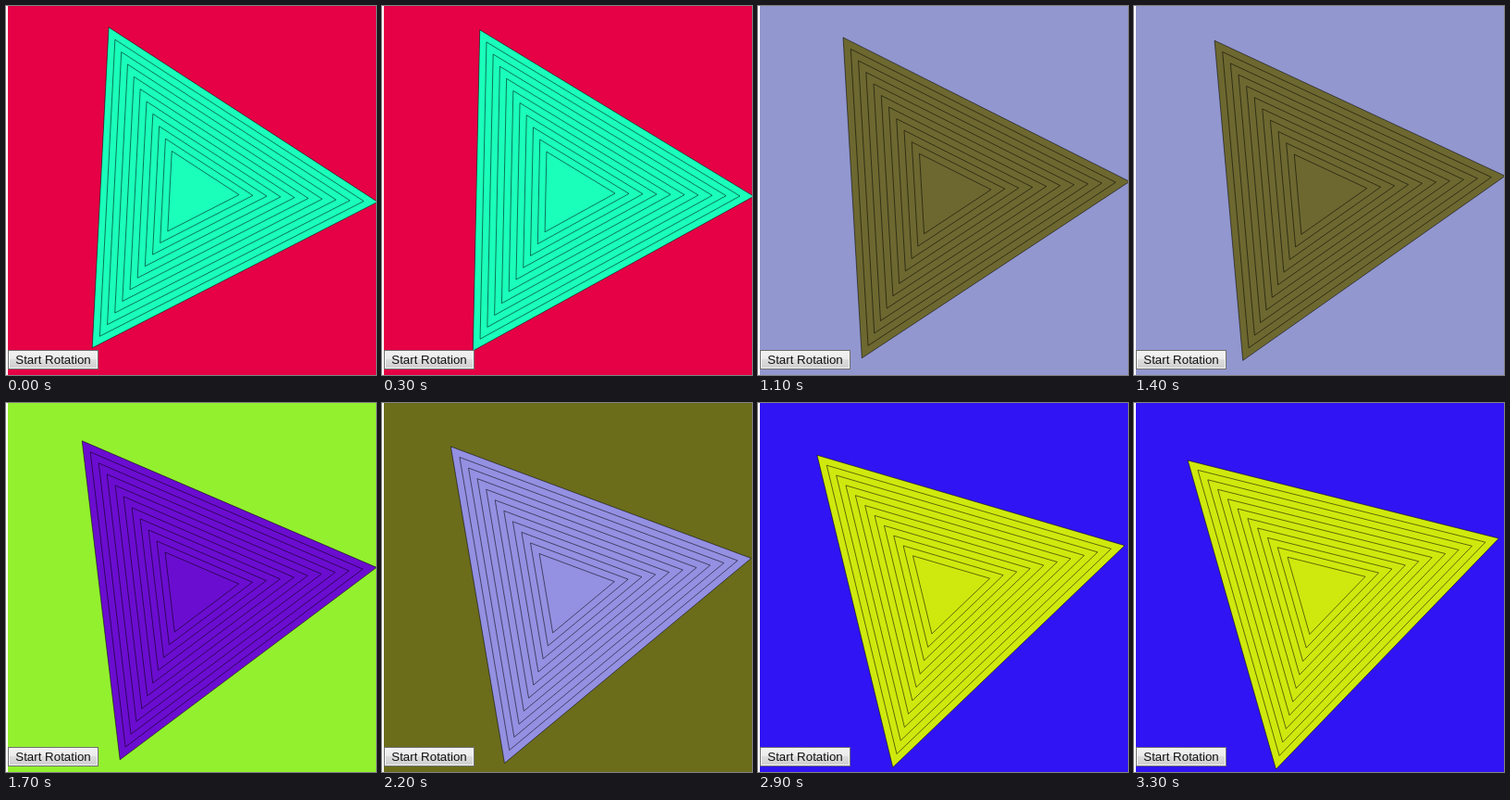
Write an HTML page with a canvas that moves like this. It is 400 px wide and 398 px high and loops after 3.4 s.

```html
<!DOCTYPE html>
<html lang="en">
<head>
<meta charset="utf-8">
<title>Rotating triangles</title>
<style>
html, body { margin: 0; width: 400px; height: 398px; overflow: hidden; background: #fff; }
canvas { position: absolute; left: 2px; top: 0; }
button {
  position: absolute; left: 2px; top: 371px; width: 98px; height: 21px;
  box-sizing: border-box; margin: 0; padding: 0;
  border: 1px solid #707070; border-radius: 0;
  background: linear-gradient(#f2f2f2, #ebebeb 50%, #dddddd 50%, #cfcfcf);
  box-shadow: inset 0 0 0 1px #f3f3f3; color: #111;
  font: 13.333px/19px Arial, "Liberation Sans", sans-serif; white-space: nowrap;
}
</style>
</head>
<body>
<canvas width="398" height="398"></canvas>
<button type="button">Start Rotation</button>
<script>
const ctx = document.querySelector('canvas').getContext('2d');
const LOOP = 3400, STEP = 100, CX = 200, CY = 201;
const START_ANGLE = 0.0515, TURN = 0.01;
// [background, triangle]
const palette = [
  ['#e60045', '#1affba'],
  ['#a0e044', '#5e1eba'],
  ['#9297cf', '#6d6830'],
  ['#93f02f', '#6b0dd0'],
  ['#6b6d1b', '#9490e2'],
  ['#3014f4', '#cfe90e']
];
ctx.lineWidth = 0.55;

function triangle(radius, angle) {
  ctx.beginPath();
  for (let i = 0; i < 3; i++) {
    const a = angle + i * Math.PI * 2 / 3;
    ctx.lineTo(CX + radius * Math.cos(a), CY + radius * Math.sin(a));
  }
  ctx.closePath();
  ctx.fill();
  ctx.stroke();
}

function draw(now) {
  const step = Math.floor(now % LOOP / STEP);
  const [back, fill] = palette[Math.floor((step + 2) / 6)];
  ctx.fillStyle = back;
  ctx.fillRect(0, 0, 398, 398);
  ctx.fillStyle = fill;
  for (let r = 200; r >= 50; r -= 15) triangle(r, START_ANGLE - step * TURN);
}

const start = performance.now();
function tick() {
  draw(performance.now() - start);
  requestAnimationFrame(tick);
}
tick();
</script>
</body>
</html>
```
